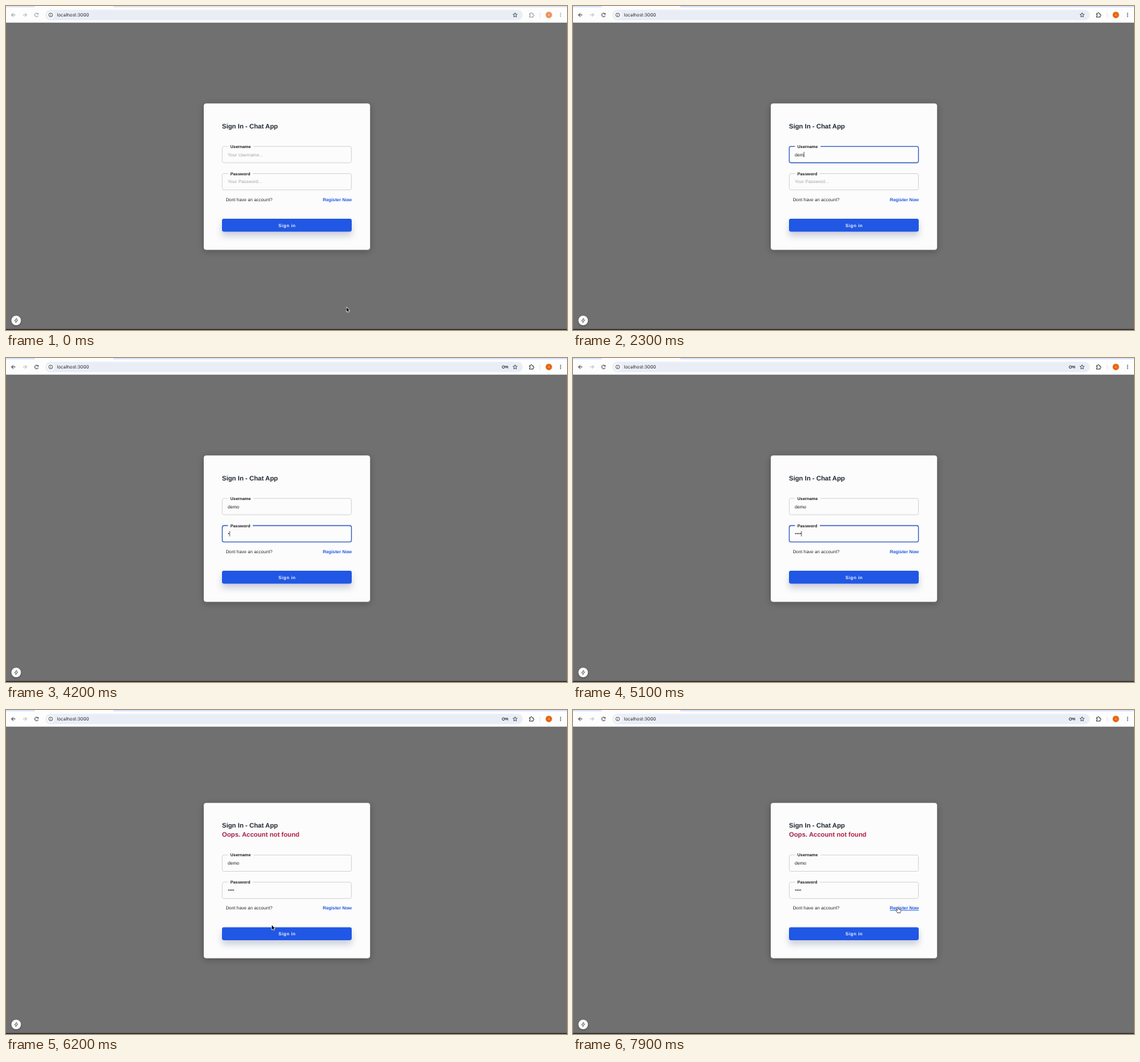
An HTML page with a canvas that plays this animation: 800 by 463 pixels, repeating every 8000 ms.

```html
<!DOCTYPE html>
<html lang="en">
<head>
<meta charset="utf-8">
<title>Sign In - Chat App</title>
<style>
  html, body { margin: 0; width: 100%; height: 100%; overflow: hidden; background: #707070; }
  canvas { display: block; width: 800px; height: 463px; }
</style>
</head>
<body>
<canvas id="stage" width="800" height="463"></canvas>
<script>
const ctx = document.getElementById('stage').getContext('2d');
const LOOP = 8000;
const SANS = '"Liberation Sans", Arial, sans-serif';
const LEFT = 308, RIGHT = 493;
const ACTIVATE = 1500, TAB = 3900, SUBMIT = 6100;
const NAME = 'demo';
const NAME_KEYS = [1900, 2100, 2300, 2600];
const PASS_KEYS = [4200, 4400, 4600, 4850];
// Pointer path: start time, end time, from, to
const MOVES = [
  [400, 1200, [485.5, 430.5], [358, 211]],
  [5250, 5800, [358, 211], [379, 307.5]],
  [6600, 7100, [379, 307.5], [449, 270.5]],
  [7100, 7500, [449, 270.5], [462.5, 282.5]]
];

const clamp = v => Math.max(0, Math.min(1, v));
const ease = v => v * v * (3 - 2 * v);
const typed = (keys, t) => keys.filter(k => t >= k).length;

function text(str, x, y, size, color, weight = 400, spacing = 0, family = SANS) {
  ctx.font = `${weight} ${size}px ${family}`;
  ctx.letterSpacing = spacing + 'px';
  ctx.fillStyle = color;
  ctx.fillText(str, x, y);
  return ctx.measureText(str).width;
}

function box(x, y, w, h, r, color) {
  ctx.beginPath();
  ctx.roundRect(x, y, w, h, r);
  ctx.fillStyle = color;
  ctx.fill();
}

function disc(x, y, r, color) {
  ctx.beginPath();
  ctx.arc(x, y, r, 0, 7);
  ctx.fillStyle = color;
  ctx.fill();
}

function ring(x, y, r, color, width = 0.9, from = 0, to = 7) {
  ctx.beginPath();
  ctx.arc(x, y, r, from, to);
  ctx.strokeStyle = color;
  ctx.lineWidth = width;
  ctx.stroke();
}

function path(d, x, y, stroke, width, fill) {
  const p = new Path2D(d);
  ctx.save();
  ctx.translate(x, y);
  ctx.lineJoin = 'round';
  if (stroke) {
    ctx.strokeStyle = stroke;
    ctx.lineWidth = width;
    ctx.stroke(p);
  }
  if (fill) {
    ctx.fillStyle = fill;
    ctx.fill(p);
  }
  ctx.restore();
}

function shadow(color, blur, y) {
  ctx.shadowColor = color;
  ctx.shadowBlur = blur;
  ctx.shadowOffsetY = y;
}

function drawBrowser(active, hasKey) {
  const ink = active ? '#2c2d30' : '#8f9195';
  const faint = active ? '#b4b5b8' : '#a9abae';
  ctx.fillStyle = active ? '#d3e2fb' : '#dfe3e9';
  ctx.fillRect(0, 0, 800, 2);
  ctx.fillStyle = '#fdfdfe';
  ctx.fillRect(41, 0, 112, 2);
  ctx.fillRect(0, 1.8, 800, 22);
  ctx.fillStyle = '#d9dadc';
  ctx.fillRect(0, 23.3, 800, 0.6);

  const arrow = 'M2.8 0H-2.5M0 -2.7L-2.7 0L0 2.7';
  path(arrow, 10.5, 12.8, ink, 0.95);
  ctx.save();
  ctx.translate(27, 12.8);
  ctx.scale(-1, 1);
  path(arrow, 0, 0, faint, 0.95);
  ctx.restore();
  ring(43.6, 12.8, 2.6, ink, 0.95, 0.4, 5.5);
  path('M2.8 -3V-0.6H0.4Z', 43.6, 12.8, null, 0, ink);

  box(56, 5.4, 681, 14.8, 7.4, '#e9eef6');
  disc(63.8, 12.8, 5.2, '#fbfcfe');
  ring(63.8, 12.8, 2.8, '#36383b', 0.8);
  path('M0 -0.3V1.6M0 -1.6V-0.9', 63.8, 12.8, '#36383b', 0.8);
  text('localhost:3000', 72.6, 15.1, 6.47, '#26282c', 400, 0, 'Inter, sans-serif');

  if (hasKey) {
    ring(709.3, 12.9, 1.8, '#3c3e42', 1);
    path('M1.8 0H6.3V1.9M4.3 0V1.8M1.8 -1.1H6.3V0', 709.3, 12.9, '#3c3e42', 0.8);
  }
  path('M0 -3.2L0.9 -1.1L3.1 -0.9L1.4 0.6L1.9 2.8L0 1.6L-1.9 2.8L-1.4 0.6L-3.1 -0.9L-0.9 -1.1Z',
    726, 12.9, '#3c3e42', 0.8);
  path('M-2.8 -2H-1C-1.2 -4 1.2 -4 1 -2H2.4V-0.4C4 -0.5 4 1.6 2.4 1.5V3H-2.8V1.4C-1.2 1.4 -1.2 -0.6 -2.8 -0.6Z',
    749.3, 12.9, ink, 0.95);
  ctx.fillStyle = '#d5dff0';
  ctx.fillRect(761.4, 9.5, 0.8, 7);
  disc(774.1, 12.8, 4.6, active ? '#e8650f' : '#ee9459');
  disc(774.1, 12.8, 1.1, active ? '#f2a06a' : '#f8cdb1');
  for (let i = -1; i <= 1; i++) disc(790.8, 12.8 + i * 2.3, 0.75, ink);
}

function drawField(label, hint, value, y, gapEnd, focused, caret, dots) {
  ctx.save();
  // Leave the label's slot open in the border
  ctx.beginPath();
  ctx.rect(300, y - 2, 16.5, 30);
  ctx.rect(gapEnd, y - 2, 200, 30);
  ctx.rect(316.5, y + 3, gapEnd - 316.5, 25);
  ctx.clip();
  ctx.beginPath();
  ctx.roundRect(LEFT + 0.4, y, RIGHT - LEFT - 0.8, 23.3, 2.4);
  ctx.strokeStyle = focused ? '#4268c6' : '#d6d7d9';
  ctx.lineWidth = focused ? 1.3 : 1;
  ctx.stroke();
  ctx.restore();

  text(label, 320, y + 2, 6, '#202124', 700);
  let end = 316.3;
  if (dots) {
    for (let i = 0; i < dots; i++) disc(317.5 + i * 2.3, y + 11.3, 0.85, '#2a2b2e');
    end += dots * 2.3;
  } else if (value) {
    end += text(value, 316.3, y + 13.9, 6.47, '#1d1e20');
  } else {
    text(hint, 316.3, y + 13.9, 6.47, '#a3a5aa');
  }
  if (caret) {
    ctx.fillStyle = '#222326';
    ctx.fillRect(end, y + 7.8, 0.7, 7.6);
  }
}

function drawCard(t, hover, linkHover) {
  const failed = t >= SUBMIT;
  const top = failed ? 132.7 : 139.2;
  const dy = failed ? 6.5 : 0;
  ctx.save();
  shadow('rgba(0,0,0,.28)', 10, 2);
  box(282, top, 237.2, failed ? 222 : 209.2, 3.7, '#fcfcfc');
  ctx.restore();

  text('Sign In - Chat App', LEFT, 174.8 - dy, 9.24, '#1f2630', 700);
  if (failed) {
    const g = ctx.createLinearGradient(LEFT, 0, 419, 0);
    g.addColorStop(0, '#962150');
    g.addColorStop(0.5, '#a81c45');
    g.addColorStop(1, '#b81d3b');
    text('Oops. Account not found', LEFT, 181.2, 9.24, g, 700);
  }

  const inName = t >= ACTIVATE && t < TAB;
  const inPass = t >= TAB && t < SUBMIT;
  const keys = inName ? NAME_KEYS : PASS_KEYS;
  const last = Math.max(inName ? ACTIVATE : TAB, ...keys.filter(k => k <= t));
  const lit = (t - last) % 1000 < 500;
  drawField('Username', 'Your Username...', NAME.slice(0, typed(NAME_KEYS, t)),
    200.7 + dy, 353, inName, inName && lit);
  drawField('Password', 'Your Password...', '',
    239.5 + dy, 352, inPass, inPass && lit, typed(PASS_KEYS, t));

  text('Dont have an account?', 313.4, 278.5 + dy, 6.47, '#2b2d31');
  text('Register Now', 451.8, 278.5 + dy, 6.47, '#1f58e2', 700);
  if (linkHover) {
    ctx.fillStyle = '#1f58e2';
    ctx.fillRect(451.8, 279.3 + dy, 41.4, 0.8);
  }

  ctx.save();
  shadow('rgba(40,60,110,.24)', 10, 6);
  box(LEFT, 304.1 + dy, RIGHT - LEFT, 18.3, 2.4, hover ? '#1a41cf' : '#2057e5');
  ctx.restore();
  text('Sign in', 388.6, 315.5 + dy, 6.47, '#eef2fd', 700, 0.42);
}

function drawBadge() {
  ctx.save();
  shadow('rgba(0,0,0,.3)', 3, 1);
  disc(14.5, 449.4, 6.8, '#fbfbfb');
  ctx.restore();
  path('M0.6 -3.3L-2.3 0.6H-0.3L-0.6 3.3L2.3 -0.6H0.3Z', 14.5, 449.4, '#4a4a4a', 0.7);
}

function pointerAt(t) {
  let p = MOVES[0][2];
  for (const [start, end, a, b] of MOVES) {
    if (t < start) break;
    const k = ease(clamp((t - start) / (end - start)));
    p = a.map((v, i) => v + (b[i] - v) * k);
  }
  return p;
}

function drawPointer(kind, x, y) {
  if (kind === 'hand') {
    path('M-0.2 0.3C0.1 -0.4 1 -0.3 1.2 0.4L1.6 2.4L4 2.9C4.9 3.2 4.9 4 4.6 5L4 7.1H0.6L-1.5 4.5C-1.8 3.8 -1 3.4 -0.4 3.9L0.3 4.4Z',
      x, y, '#1b1b1b', 1.1, '#fff');
  } else if (kind === 'beam') {
    path('M-1.3 -0.4Q0 -0.4 0 0.8V6.4Q0 7.6 -1.3 7.6M1.3 -0.4Q0 -0.4 0 0.8M0 6.4Q0 7.6 1.3 7.6',
      x, y, '#222', 0.8);
  } else {
    path('M0 0V6.3L1.4 5L2.4 7.3L3.5 6.8L2.5 4.6H4.4Z', x, y, '#fff', 1.1, '#0b0b0b');
  }
}

function draw(t) {
  ctx.fillStyle = '#707070';
  ctx.fillRect(0, 0, 800, 463);
  drawBrowser(t >= ACTIVATE, t >= PASS_KEYS[0]);

  const [x, y] = pointerAt(t);
  const failed = t >= SUBMIT;
  const dy = failed ? 6.5 : 0;
  const within = (l, r, a, b) => x >= l && x <= r && y >= a + dy && y <= b + dy;
  const hover = t >= ACTIVATE && within(LEFT, RIGHT, 304, 322.5);
  const link = t >= ACTIVATE && within(451.5, 493.5, 272, 281);
  const field = t >= ACTIVATE && (within(LEFT, RIGHT, 201, 224) || within(LEFT, RIGHT, 240, 263));
  drawCard(t, hover, link);
  drawBadge();

  ctx.fillStyle = '#252525';
  ctx.fillRect(0, 461.7, 800, 1.3);

  const hidden = t >= NAME_KEYS[0] && t < MOVES[1][0];
  if (!hidden) drawPointer(hover || link ? 'hand' : field ? 'beam' : 'arrow', x, y);
}

ctx.textRendering = 'geometricPrecision';
const begin = performance.now();
function tick() {
  draw((performance.now() - begin) % LOOP);
  requestAnimationFrame(tick);
}
tick();
</script>
</body>
</html>
```
